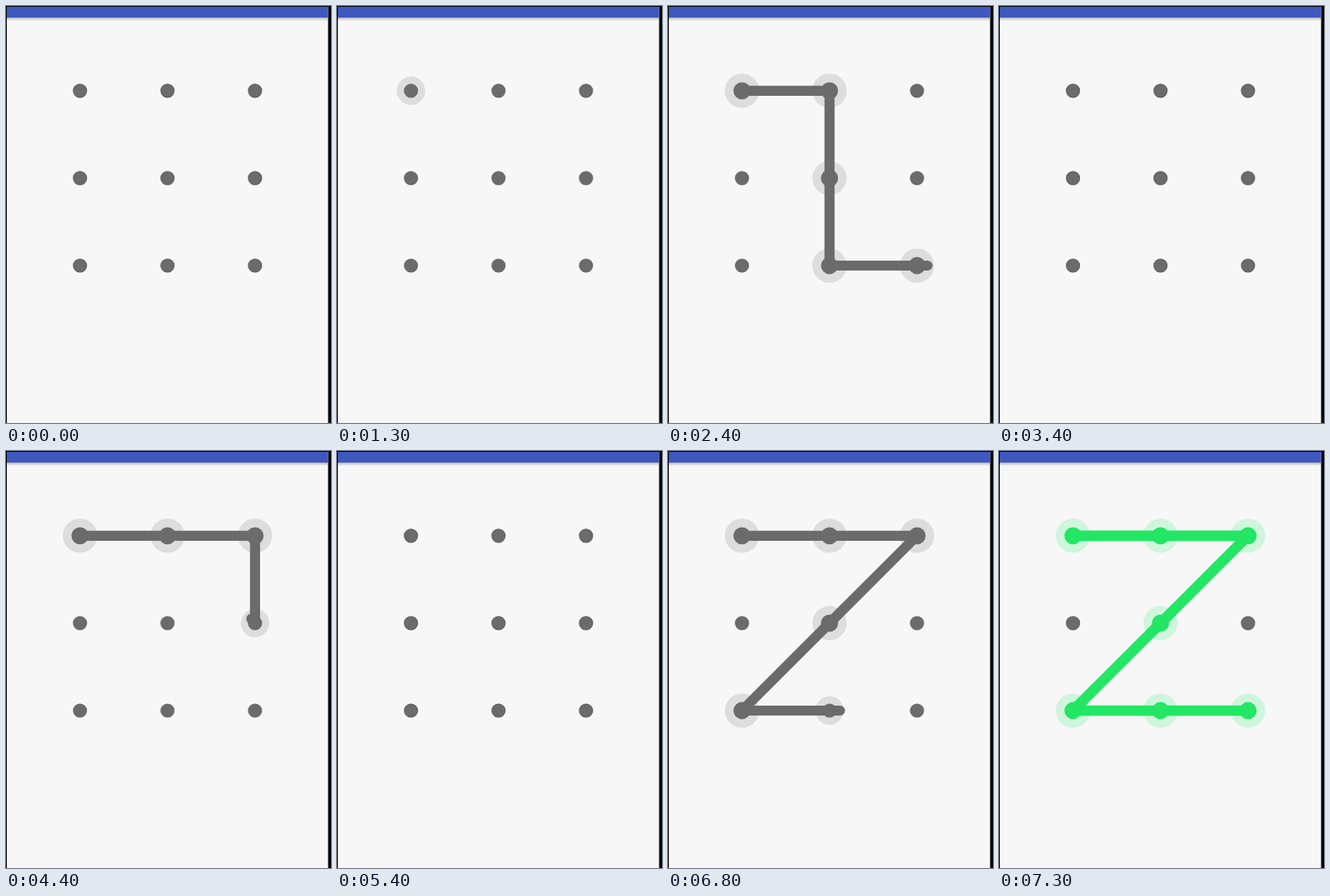
These frames come from a looping animation (394 by 506 pixels, 8000 ms). An HTML page with a canvas:

```html
<!DOCTYPE html>
<html lang="en">
<head>
<meta charset="utf-8">
<title>Pattern lock</title>
<style>
html, body { margin: 0; width: 100%; height: 100%; overflow: hidden; background: #f7f7f7; }
canvas { display: block; }
</style>
</head>
<body>
<canvas id="stage" width="394" height="506"></canvas>
<script>
const ctx = document.getElementById('stage').getContext('2d');
const LOOP = 8000, STEP = 100;
const GREY = '#6b6b6b', RED = '#f44336', GREEN = '#22e664';
const GAP = 106.1, DOT = 8.6, DOT_ACTIVE = 10.4;
const HIT = 0.35; // catch distance in grid cells

// Finger key points: step, column, row; the finger moves evenly between them.
const gestures = [
  { start: 1300, verdict: 2700, end: 3400, color: RED, keys: [
    [0, 0, 0], [3.5, 0.9, 0], [5, 0.955, 0.52], [7, 0.93, 1.8], [8, 0.91, 2], [11, 2.12, 2]] },
  { start: 3900, verdict: 4800, end: 5400, color: RED, keys: [
    [0, 0, 0], [3, 1.78, 0.03], [5, 1.957, 0.95], [8, 1.96, 2.1]] },
  { start: 5900, verdict: 7300, end: LOOP, color: GREEN, keys: [
    [0, 0, 0], [3, 1.78, 0.03], [4, 1.9, 0.11], [6, 0.2, 1.8], [7, 0.03, 2], [11, 2.21, 2]] }
];

const dots = Array.from({ length: 9 }, (_, i) => ({ col: i % 3, row: Math.floor(i / 3) }));
const place = ({ col, row }) => [89.7 + col * GAP, 102.8 + row * GAP];

function fingerAt(keys, step) {
  const next = keys.findIndex(key => key[0] > step);
  if (next < 0) {
    const [, col, row] = keys[keys.length - 1];
    return { col, row };
  }
  const [s0, col, row] = keys[next - 1];
  const [s1, col1, row1] = keys[next];
  const k = (step - s0) / (s1 - s0);
  return { col: col + (col1 - col) * k, row: row + (row1 - row) * k };
}

// Dots caught by the finger so far, with the step of each catch.
function caughtDots(keys, last) {
  const caught = new Map();
  for (let step = 0; step <= last; step++) {
    const { col, row } = fingerAt(keys, step);
    const dot = dots.find(d => Math.abs(d.col - col) < HIT && Math.abs(d.row - row) < HIT);
    if (dot && !caught.has(dot)) caught.set(dot, step);
  }
  return caught;
}

function disc(cell, radius, color, alpha = 1) {
  ctx.globalAlpha = alpha;
  ctx.fillStyle = color;
  ctx.beginPath();
  ctx.arc(...place(cell), radius, 0, Math.PI * 2);
  ctx.fill();
  ctx.globalAlpha = 1;
}

function rect(color, x, y, w, h) {
  ctx.fillStyle = color;
  ctx.fillRect(x, y, w, h);
}

function drawScreen() {
  rect('#000', 0, 0, 394, 506);
  rect('#f7f7f7', 1, 1, 389.5, 505);
  rect('#3f58be', 1, 1, 389.5, 13);
  const shadow = ctx.createLinearGradient(0, 14, 0, 18);
  shadow.addColorStop(0, 'rgba(0,0,0,.28)');
  shadow.addColorStop(1, 'rgba(0,0,0,0)');
  rect(shadow, 1, 14, 389.5, 4);
}

function drawPattern({ start, verdict, color: result, keys }, time) {
  const step = Math.floor((time - start) / STEP);
  const done = time >= verdict;
  const color = done ? result : GREY;
  const caught = caughtDots(keys, step);
  const radius = caughtStep => caughtStep === step ? DOT : DOT_ACTIVE;

  caught.forEach((at, dot) => disc(dot, radius(at) * 2, color, 0.19));

  ctx.strokeStyle = color;
  ctx.lineWidth = done ? 12.7 : 12.2;
  ctx.lineCap = ctx.lineJoin = 'round';
  ctx.beginPath();
  for (const dot of caught.keys()) ctx.lineTo(...place(dot));
  if (!done) ctx.lineTo(...place(fingerAt(keys, step)));
  ctx.stroke();

  caught.forEach((at, dot) => disc(dot, radius(at), color));
  return caught;
}

function draw(time) {
  drawScreen();
  const gesture = gestures.find(g => time >= g.start && time < g.end);
  const caught = gesture ? drawPattern(gesture, time) : new Map();
  const outlined = !gesture || time >= gesture.verdict;
  for (const dot of dots) {
    if (caught.has(dot)) continue;
    if (outlined) disc(dot, DOT, '#585858');
    disc(dot, outlined ? DOT - 0.8 : DOT, GREY);
  }
}

function tick() {
  draw(performance.now() % LOOP);
  requestAnimationFrame(tick);
}
tick();
</script>
</body>
</html>
```
